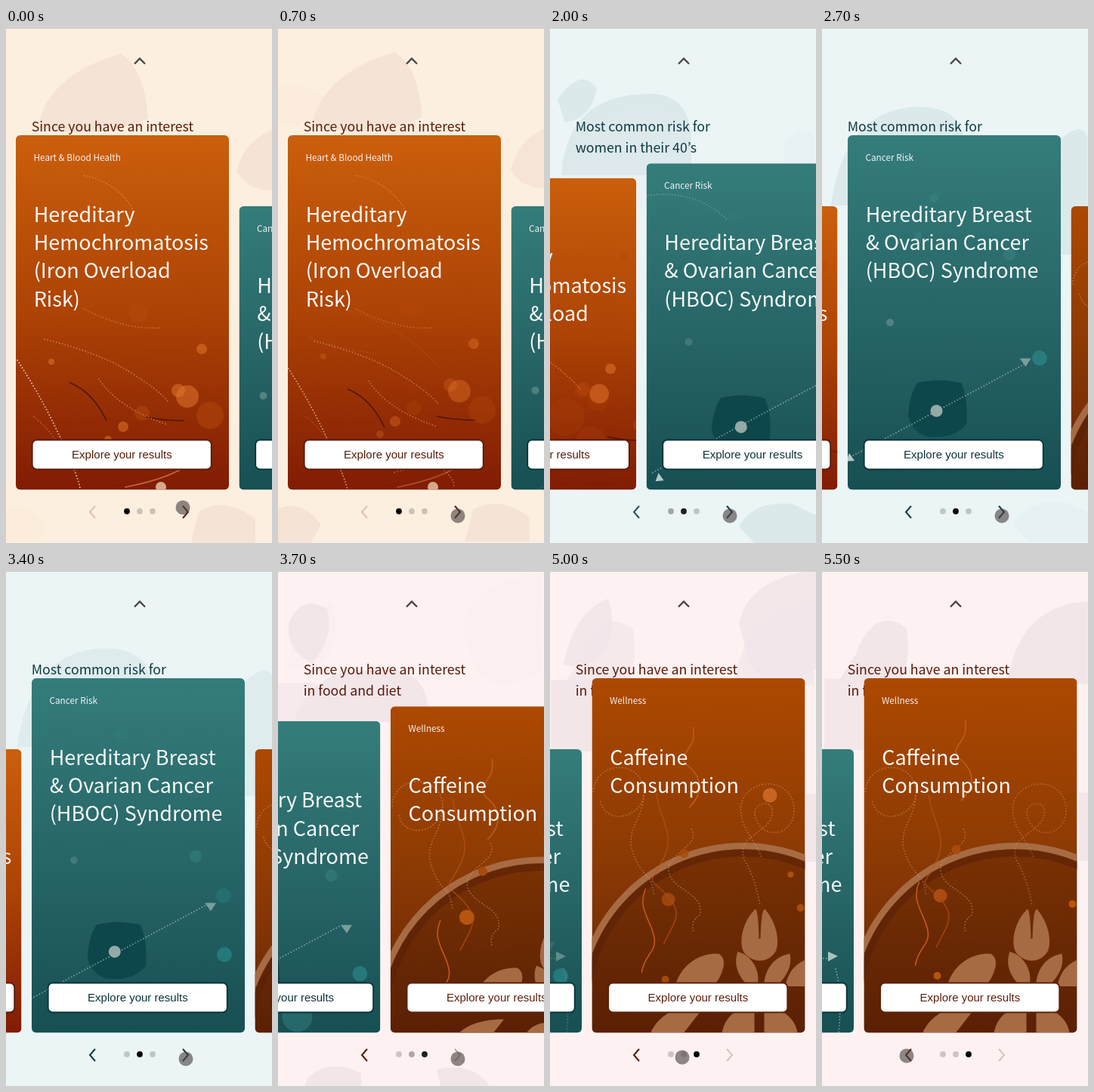
An HTML page for the animation above (5.6 s loop, 352 by 682 pixels).

```html
<!DOCTYPE html>
<html lang="en">
<head>
<meta charset="utf-8">
<title>Health results carousel</title>
<style>
  html, body { margin: 0; width: 100%; height: 100%; overflow: hidden; background: #fdefdf; }
  svg { display: block; width: 100vw; height: 100vh; }
  text { font-family: "Noto Sans CJK JP", "Noto Sans CJK SC", "Noto Sans", sans-serif; }
  .head { font-size: 17.72px; }
  .label { font-size: 11.75px; fill: #fff; fill-opacity: .93; }
  .title { font-size: 27px; fill: #fff; fill-opacity: .96; }
  .cta { font: 15px "Liberation Sans", Arial, sans-serif; text-anchor: middle; }
  .line { fill: none; stroke-width: 1.6; stroke-linecap: round; }
  .dots { stroke-dasharray: 0 4; stroke-width: 1.9; }
</style>
</head>
<body>
<svg id="stage" viewBox="0 0 352 682" preserveAspectRatio="none"></svg>
<script>
const LOOP = 5600, STEP = 100, BOTTOM = 611.6, TALL = 142, SHORT = 236;
const SLIDES = [1808, 3508], PASSED_INSET = 14;
const stage = document.getElementById('stage');

// Moving artwork: each piece swells and fades around its peak time while drifting (px per second).
const piece = (markup, peak, span, vx = 0, vy = 0) => ({ markup, peak, span, vx, vy });
const dot = (x, y, r, fill, peak, span, vx = 0, vy = -10) =>
  piece(`<circle cx="${x}" cy="${y}" r="${r}" fill="${fill}"/>`, peak, span, vx, vy);
const line = (d, stroke, peak, span, vx, vy, width = 1.6) =>
  piece(`<path class="line" d="${d}" stroke="${stroke}" stroke-width="${width}"/>`, peak, span, vx, vy);
const dotted = (d, stroke, peak, span, vx, vy) =>
  piece(`<path class="line dots" d="${d}" stroke="${stroke}"/>`, peak, span, vx, vy);
const shape = (d, fill, peak, span, vx, vy) =>
  piece(`<path d="${d}" fill="${fill}"/>`, peak, span, vx, vy);

const glow = '#e0742b8c', dim = '#b5490d80', rust = '#4d1607', pale = '#f0b07a66';
const teal = '#2b8f8f99', faintTeal = '#3d8c8a66', mist = '#bcd2cc99', deep = '#0d464b';
const spice = '#c25a1a', ember = '#b5550f', tan = '#a76b44', steam = '#d39c7480';
const ALWAYS = 1e6;

const bloodArt = [
  dot(246, 425, 7, glow, 0, 1100), dot(142, 528, 7, glow, 0, 1000), dot(47, 442, 4, glow, 0, 900),
  dot(167, 510, 10, dim, 0, 900), dot(227, 488, 15, glow, 0, 1100), dot(257, 513, 18, dim, 0, 1000),
  dot(162, 377, 13, dim, 0, 900), dot(122, 545, 5, glow, 0, 900), dot(215, 480, 9, glow, 0, 900),
  dot(72, 440, 27, glow, 1450, 750), dot(65, 475, 26, glow, 1450, 750),
  dot(107, 475, 23, glow, 1500, 750), dot(101, 514, 27, glow, 1500, 750),
  dot(189, 492, 25, dim, 1500, 600), dot(222, 524, 20, dim, 1500, 600),
  dot(209, 458, 10, dim, 1500, 600), dot(231, 470, 14, dim, 1500, 600), dot(287, 503, 9, glow, 1500, 600),
  dot(233, 453, 13, glow, 2300, 700), dot(212, 447, 9, dim, 2300, 700),
  dot(248, 420, 7, glow, 2300, 700), dot(266, 272, 6, dim, 2300, 700),
  dot(192, 608, 7, '#d9a78a', 0, ALWAYS, 0, 0),
  line('M72 470Q102 482 120 520', rust, 0, 2600, 11, 12),
  line('M172 515Q195 520 222 520', rust, 0, 3600, 36, -1, 2),
  line('M145 608Q195 598 219 584', '#e69a6a99', 0, 1000, 0, 0),
  dotted('M2 440Q35 490 60 545T85 611', '#ffe9d5cc', 0, 1100, -8, 6),
  dotted('M110 465Q135 503 200 525M38 412Q110 430 150 455T202 495', '#f0b78a80', 0, 1300, -4, 4),
  dotted('M90 195Q135 205 155 240M90 372Q145 400 190 397', pale, 0, 1200),
  dotted('M24 515Q50 535 70 575', pale, 0, 900),
  dotted('M32 410Q75 425 124 432M85 374Q155 395 208 452', '#f0b78a80', 1500, 900, 5, 0),
  dotted('M145 590Q200 575 214 590T222 611', '#ffe2ccbb', 1500, 1000, 5, 2)
];

const cancerArt = [
  shape('M92 470Q120 463 150 470Q160 490 157 525Q140 545 105 541Q84 535 80 512Q82 485 92 470Z', deep, 2700, 2500, -9, -2),
  dotted('M4 568L236 444', mist, 2700, 2300, -6, -3),
  dot(117.5, 507, 8, '#94aaa6', 2700, 2400, -11, -4),
  shape('M-2 574L2 563L9 573Z', '#b4cbc6', 2700, 1600, -20, -11),
  shape('M228 438H243L236 449Z', '#7b9e9b', 2900, 2300, 2, 3),
  dot(254, 437, 10, teal, 2700, 900), dot(255, 503, 10, teal, 3900, 1000),
  dot(254, 493, 10, teal, 4600, 900), dot(172, 562, 20, faintTeal, 3700, 700),
  dot(114, 225, 6, faintTeal, 2700, 800), dot(94, 275, 5, faintTeal, 2700, 800),
  dot(214, 300, 8, faintTeal, 2700, 800), dot(56, 390, 5, '#7ca19d80', 2700, 1000),
  dot(217, 375, 8, faintTeal, 3700, 700), dot(32, 440, 5, '#7ca19d88', 0, 1300),
  dotted('M2 203Q65 195 107 235', '#a5c6c066', 2000, 600),
  dotted('M0 167Q25 165 45 175', '#a5c6c088', 1500, 400),
  dotted('M190 466H250M258 480Q267 510 262 565', mist, 5600, 750),
  shape('M248 457L261 463L248 470Z', '#a5c4be', 5600, 750)
];

const coffeeArt = [
  piece(`<circle cx="200" cy="581.5" r="215" fill="#3d1402" fill-opacity=".25"/>
    <circle cx="200" cy="581.5" r="208" fill="none" stroke="#592007" stroke-opacity=".6" stroke-width="9"/>
    <circle cx="200" cy="581.5" r="217.5" fill="none" stroke="${tan}" stroke-width="8.5"/>`, 0, ALWAYS),
  shape(`M216 448C201 462 193 490 201 505Q210 516 222 516Q235 516 243 504C250 488 242 462 229 448Q224 447 223 487H221Q220 447 216 448Z
    M193 504C213 510 223 530 219 548H205C193 535 187 520 193 504Z
    M262 507C240 510 228 530 228 548H246C259 535 265 522 262 507Z
    M108 560C112 525 140 505 168 507Q181 515 168 540L152 562Z
    M78 611C90 585 115 575 150 575L122 611Z
    M172 611Q178 585 200 580H215V611Z
    M228 580H245Q268 590 272 611H228Z
    M282 515Q260 525 256 550H282Z`, tan, 0, ALWAYS),
  line('M134 216C140 245 112 250 125 265C150 285 145 305 129 322', spice, 4500, 4500, 0, -18),
  line('M84 290C88 325 112 345 92 380S75 400 98 425S108 460 94 490', '#bd561899', 4500, 4500, 2, 8),
  line('M69 430C58 455 75 470 80 492S68 515 64 540', spice, 4500, 4500, 4, -18),
  dotted('M2 292C5 250 65 250 69 290C71 325 20 340 11 305M69 290C70 330 42 340 55 375S78 395 82 430', steam, 4500, 4500, 0, 0),
  dotted('M132 342C145 365 95 375 102 400S148 425 143 455Q129 465 135 480', steam, 4500, 4500, 0, 0),
  dotted('M222 440Q215 405 202 383C190 350 230 350 238 325C245 300 210 305 216 325C226 360 273 350 267 310C260 270 202 275 197 312C196 340 215 355 225 380', steam, 4800, 1200, 0, 0),
  dot(235.5, 300, 9.5, '#c96724', 4500, 1000, 0, -6), dot(263, 407, 4, ember, 4500, 900),
  dot(101, 440, 10, ember, 3700, 700), dot(122, 379, 6, '#a94b0c', 3700, 700),
  dot(101, 430, 9, '#ab4b12', 5500, 800), dot(122, 369, 6, '#a94b0c', 5500, 800),
  dot(97, 536, 5, ember, 5500, 800), dot(276, 441, 5, ember, 5500, 800)
];

const cards = [
  { x: 13, label: 'Heart & Blood Health', title: ['Hereditary', 'Hemochromatosis', '(Iron Overload', 'Risk)'],
    colors: ['#ca5f0c', '#ad4305', '#811c04'], ink: '#581b08', art: bloodArt },
  { x: 308.5, label: 'Cancer Risk', title: ['Hereditary Breast', '& Ovarian Cancer', '(HBOC) Syndrome'],
    colors: ['#347d7b', '#286668', '#174f53'], ink: '#0b333a', art: cancerArt },
  { x: 604, label: 'Wellness', title: ['Caffeine', 'Consumption'],
    colors: ['#ad4900', '#8c3a04', '#642406'], ink: '#5c200b', art: coffeeArt }
];

const scenes = [
  { bg: '#fdefdf', tint: '#f5e3d5', ink: '#5a1b0a', scroll: 0, head: ['Since you have an interest', 'in heart health'], shapes: [
    ['M42 132Q55 62 152 34Q184 55 188 120Q120 150 42 132Z', 0, 1300],
    ['M305 190Q315 150 352 135V215Q320 215 305 190Z', 0, 1200],
    ['M255 640Q290 620 330 650V682H245Z', 0, 1400],
    ['M86 150Q92 85 150 74Q190 88 188 150Z', 1500, 900],
    ['M0 75Q50 65 70 100Q45 135 0 125Z', 1500, 900],
    ['M0 635Q35 620 60 655L45 682H0Z', 1500, 1700]] },
  { bg: '#ebf5f6', tint: '#dce9eb', ink: '#0c3a40', scroll: 274.5, head: ['Most common risk for', 'women in their 40’s'], shapes: [
    ['M15 195Q22 88 130 87Q180 85 187 140V195Z', 2000, 700],
    ['M10 95Q40 50 62 80Q55 120 20 125Z', 2000, 600],
    ['M250 660Q270 625 320 630L352 645V682H270Z', 2000, 800],
    ['M12 235Q30 108 125 104Q185 103 189 150V235Z', 2800, 900],
    ['M312 150Q345 120 352 145V300H312Z', 2800, 900]] },
  { bg: '#fdf2f1', tint: '#f2e6e9', ink: '#58190b', scroll: 548.5, head: ['Since you have an interest', 'in food and diet'], shapes: [
    ['M14 70Q30 30 65 50Q75 90 45 122Q10 105 14 70Z', 3700, 700],
    ['M22 200Q40 130 120 132Q205 120 198 200Z', 3700, 700],
    ['M40 670Q70 645 110 665V682H35ZM210 660Q260 650 280 682H215Z', 3700, 1000],
    ['M248 70Q262 10 352 0V130Q290 165 262 125Z', 4500, 900],
    ['M16 125Q30 55 75 38Q88 80 70 110Q45 135 16 125Z', 4500, 900],
    ['M0 145H55V240H0Z', 4700, 1400],
    ['M246 145Q262 45 352 40V150Z', 5600, 900],
    ['M45 110Q70 45 112 75Q120 125 100 150H20Z', 5600, 900],
    ['M338 295H352V385H338Z', 5000, 1400]] }
];

const escapeText = s => s.replace(/&/g, '&amp;');
const artMarkup = list => list.map(p => `<g class="piece">${p.markup}</g>`).join('');
const textLines = (lines, cls, x, y, step) =>
  lines.map((s, i) => `<text class="${cls}" x="${x}" y="${y + i * step}">${escapeText(s)}</text>`).join('');

const sceneMarkup = s => {
  s.art = s.shapes.map(([d, peak, span]) => shape(d, s.tint, peak, span, 4, -3));
  return `<g class="scene"><rect width="352" height="682" fill="${s.bg}"/>${artMarkup(s.art)}
    <g fill="${s.ink}">${textLines(s.head, 'head', 33.7, 137, 28)}</g></g>`;
};

const cardMarkup = (c, i) => `
  <linearGradient id="fill${i}" x2="0" y2="1">${c.colors.map((k, n) => `<stop offset="${n / 2}" stop-color="${k}"/>`).join('')}</linearGradient>
  <clipPath id="clip${i}"><rect class="frame" width="282" rx="6"/></clipPath>
  <g class="card"><g clip-path="url(#clip${i})">
    <rect class="frame" width="282" fill="url(#fill${i})"/>
    <g class="art">${artMarkup(c.art)}</g></g>
    <g class="content">
      <g class="copy"><text class="label" x="23.5" y="34">${escapeText(c.label)}</text>${textLines(c.title, 'title', 23.7, 114.6, 37.4)}</g>
      <rect x="21.7" y="545.5" width="237" height="39" rx="6" fill="#fff" stroke="${c.ink}" stroke-width="1.8"/>
      <text class="cta" x="140.4" y="570" fill="${c.ink}">Explore your results</text></g></g>`;

stage.innerHTML = `${scenes.map(sceneMarkup).join('')}
  <path d="M0 .5H352" stroke="#cfcac6"/>
  <path d="M170 47.5L177 40.5L184 47.5" fill="none" stroke="#4b4544" stroke-width="2.3"/>
  ${cards.map(cardMarkup).join('')}
  ${[160, 177, 194].map(x => `<circle class="page" cx="${x}" cy="640" r="3.9"/>`).join('')}
  <g fill="none" stroke-width="2">
    <path class="arrow" d="M118 633L111 641L118 649"/><path class="arrow" d="M234 633L241 641L234 649"/></g>
  <circle id="pointer" r="9.5" fill="#4a4242" fill-opacity=".62"/>`;

const all = (root, selector) => [...root.querySelectorAll(selector)];
const sceneEls = all(stage, '.scene'), cardEls = all(stage, '.card');
const pages = all(stage, '.page'), [prev, next] = all(stage, '.arrow');
const pointer = document.getElementById('pointer');
const bind = (root, list) => all(root, '.piece').forEach((el, i) => list[i].el = el);
scenes.forEach((s, i) => bind(sceneEls[i], s.art));
cards.forEach((c, i) => {
  bind(cardEls[i], c.art);
  c.frames = all(stage, '.frame').slice(i * 2, i * 2 + 2);
});

const clamp = v => Math.max(0, Math.min(1, v));
const mix = (a, b, k) => a + (b - a) * k;
const move = (el, x, y) => el.setAttribute('transform', `translate(${x} ${y})`);

// cubic-bezier(.25, .1, .25, 1)
function ease(x) {
  if (x <= 0 || x >= 1) return clamp(x);
  const curve = (a, b, u) => 3 * a * u * (1 - u) ** 2 + 3 * b * u * u * (1 - u) + u ** 3;
  let lo = 0, hi = 1;
  for (let i = 0; i < 24; i++) {
    const mid = (lo + hi) / 2;
    if (curve(.25, .25, mid) < x) lo = mid; else hi = mid;
  }
  return curve(.1, 1, lo);
}
const progress = (t, duration) => SLIDES.map(start => ease((t - start) / duration));
const weights = ([a, b]) => [1 - a, a - b, b];

function drawArt(list, t) {
  for (const p of list) {
    const dt = t - p.peak;
    const near = Math.max(0, 1 - (dt / p.span) ** 2);
    p.el.setAttribute('opacity', Math.min(1, near * 1.3));
    move(p.el, p.vx * dt / 1000, p.vy * dt / 1000);
  }
}

const PATH = [[0, 234, 635], [300, 238, 646], [4700, 238, 646], [5300, 112, 642], [LOOP, 112, 642]];
function pointerAt(t) {
  const i = PATH.findIndex((p, n) => n && t <= p[0]);
  const [t0, x0, y0] = PATH[i - 1], [t1, x1, y1] = PATH[i];
  const u = (t - t0) / (t1 - t0), k = u * u * (3 - 2 * u);
  return [mix(x0, x1, k), mix(y0, y1, k)];
}

function render(t) {
  const slide = progress(t, 500), grow = weights(progress(t, 550)), fade = progress(t, 350);
  const shown = weights(fade);
  const scroll = scenes[1].scroll * slide[0] + (scenes[2].scroll - scenes[1].scroll) * slide[1];
  const cover = SLIDES.map(start => clamp((t - start) / 180));
  const current = SLIDES.filter(start => t > start).length;

  scenes.forEach((s, i) => {
    sceneEls[i].setAttribute('opacity', i ? cover[i - 1] : 1);
    drawArt(s.art, t);
  });
  cards.forEach((c, i) => {
    const top = mix(SHORT, TALL, grow[i]), el = cardEls[i];
    move(el, c.x - scroll, 0);
    c.frames.forEach(f => { f.setAttribute('y', top); f.setAttribute('height', BOTTOM - top); });
    move(el.querySelector('.art'), 0, (top - TALL) / 2);
    move(el.querySelector('.content'), i < current ? PASSED_INSET : 0, 0);
    move(el.querySelector('.copy'), 0, top);
    drawArt(c.art, t);
  });

  pages.forEach((el, i) => el.setAttribute('fill-opacity', mix(.19, 1, shown[i])));
  prev.setAttribute('stroke', scenes[current].ink);
  next.setAttribute('stroke', scenes[current].ink);
  prev.setAttribute('opacity', mix(.22, 1, fade[0]));
  next.setAttribute('opacity', mix(1, .22, fade[1]));
  const [x, y] = pointerAt(t);
  pointer.setAttribute('cx', x);
  pointer.setAttribute('cy', y);
}

const start = performance.now();
function tick() {
  const t = Math.max(0, performance.now() - start) % LOOP;
  render(Math.floor(t / STEP) * STEP);
  requestAnimationFrame(tick);
}
tick();
</script>
</body>
</html>
```
